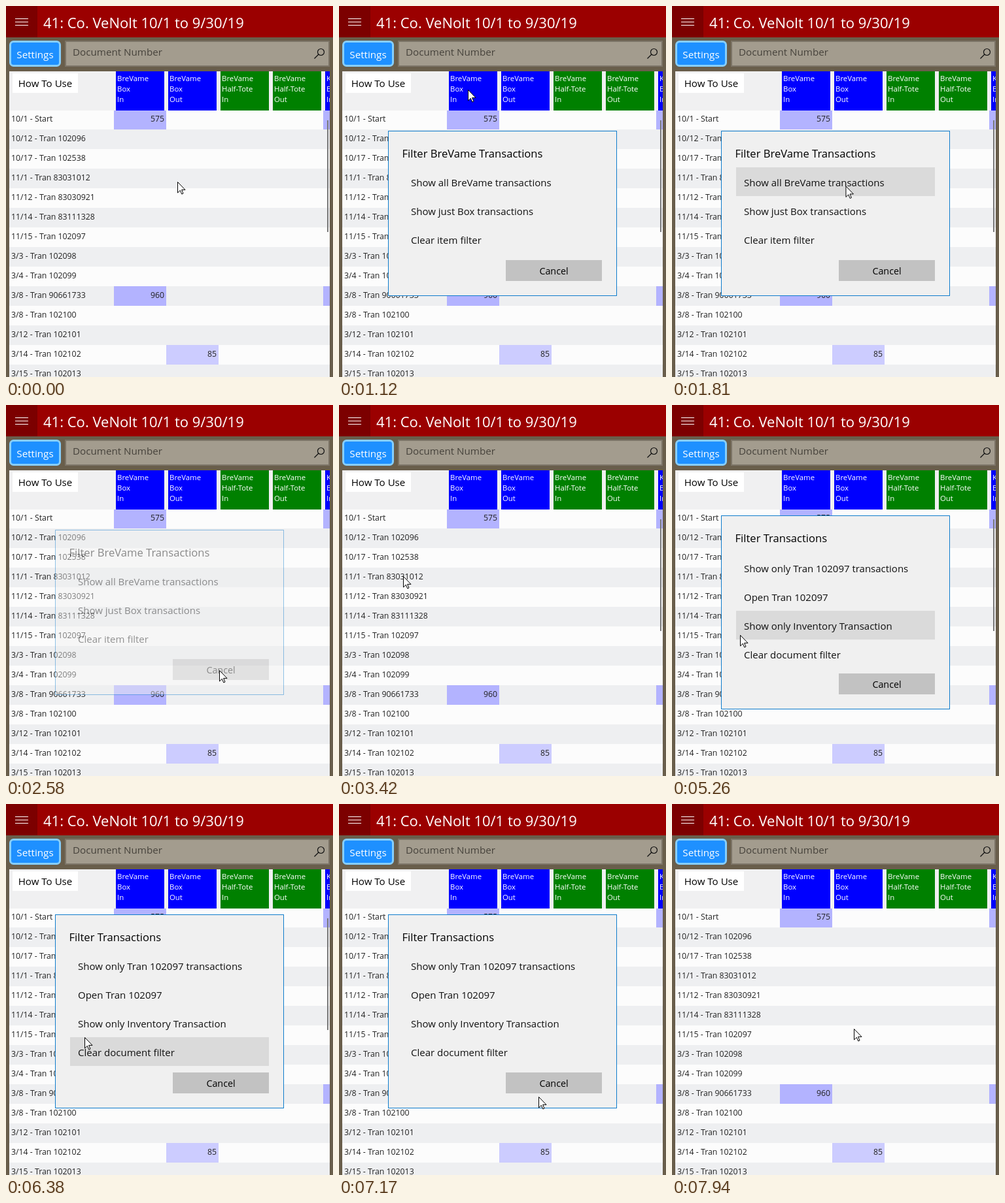
These frames come from a looping animation (500 px wide and 568 px high, 7990 ms). An HTML page:

```html
<!DOCTYPE html>
<html lang="en">
<head>
<meta charset="utf-8">
<title>Transaction filter</title>
<style>
  html, body { margin: 0; width: 100%; height: 100%; overflow: hidden; background: #695e4b; }
  svg { display: block; width: 500px; height: 568px; font-family: "Open Sans", "Noto Sans", sans-serif; }
</style>
</head>
<body>
<svg id="stage" viewBox="0 0 500 568"></svg>
<script>
const LOOP = 7990;
const FADE = 180;
const ROW = 30, COL = 80, ITEM = 44;
const BRAND = 'BreVame';
const stage = document.getElementById('stage');

const clamp = v => Math.min(1, Math.max(0, v));
const smooth = p => p * p * (3 - 2 * p);

function add(parent, tag, attrs = {}, content = '') {
  const el = document.createElementNS('http://www.w3.org/2000/svg', tag);
  for (const key in attrs) el.setAttribute(key, attrs[key]);
  el.textContent = content;
  parent.append(el);
  return el;
}
const rect = (parent, x, y, width, height, fill, more) =>
  add(parent, 'rect', { x, y, width, height, fill, ...more });
const text = (parent, x, y, size, content, fill = '#000', more) =>
  add(parent, 'text', { x, y, 'font-size': size, fill, ...more }, content);
const line = (parent, d, stroke, width) =>
  add(parent, 'path', { d, stroke, 'stroke-width': width, fill: 'none' });
const MIDDLE = { 'text-anchor': 'middle' }, END = { 'text-anchor': 'end' };

function drawBars() {
  rect(stage, 0, 0, 500, 48, '#9b0000');
  rect(stage, 0, 0, 48, 48, '#7c0000');
  line(stage, 'M14 19.5H34M14 24.5H34M14 29.5H34', '#fff', 1);
  text(stage, 57, 34, 22, '41: Co. VeNolt 10/1 to 9/30/19', '#fff');

  rect(stage, 6.5, 54.5, 76, 37, '#1e90ff', { rx: 5, stroke: '#87cefa', 'stroke-width': 3 });
  text(stage, 44.5, 80, 15.2, 'Settings', '#fff', MIDDLE);

  rect(stage, 91, 54, 403, 38, '#a39c8e', { stroke: '#7c7467', 'stroke-width': 2 });
  text(stage, 102, 76, 15.2, 'Document Number', '#46423b');
  add(stage, 'circle', { cx: 481.5, cy: 70.5, r: 5, fill: 'none', stroke: '#111', 'stroke-width': 1.2 });
  line(stage, 'M478 74L471.5 80.5', '#111', 1.3);
}

function drawGrid() {
  add(add(stage, 'clipPath', { id: 'view' }), 'rect', { x: 5, y: 100, width: 490, height: 468 });
  const grid = add(stage, 'g', { 'clip-path': 'url(#view)' });

  const rows = ['10/1 - Start', '10/12 - Tran 102096', '10/17 - Tran 102538', '11/1 - Tran 83031012',
    '11/12 - Tran 83030921', '11/14 - Tran 83111328', '11/15 - Tran 102097', '3/3 - Tran 102098',
    '3/4 - Tran 102099', '3/8 - Tran 90661733', '3/8 - Tran 102100', '3/12 - Tran 102101',
    '3/14 - Tran 102102', '3/15 - Tran 102013'];
  rows.forEach((label, i) => {
    rect(grid, 5, 159 + ROW * i, 490, ROW, i % 2 ? '#eeeff1' : '#fcfcfc');
    text(grid, 8, 177 + ROW * i, 12.3, label, '#222');
  });

  const cell = (col, row, value, fill = '#b3b3ff') => {
    const x = 165 + COL * col, y = 159 + ROW * row;
    rect(grid, x, y, COL, ROW, fill);
    text(grid, x + 77, y + 18, 12.3, value, '#222', END);
  };
  cell(0, 0, '575');
  cell(0, 9, '960');
  cell(4, 0, '');
  cell(4, 9, '');
  cell(1, 12, '85', '#ccccff');

  rect(grid, 5, 100, 490, 60, '#f0f0f1');
  rect(grid, 10, 103, 100, 30, '#fff');
  text(grid, 60, 124, 15.1, 'How To Use', '#000', MIDDLE);
  const heads = [[BRAND, 'Box', 'In'], [BRAND, 'Box', 'Out'], [BRAND, 'Half-Tote', 'In'],
    [BRAND, 'Half-Tote', 'Out'], ['Kel', 'Box', 'In']];
  heads.forEach((words, i) => {
    const x = 168 + COL * i;
    rect(grid, x, 100, 74, 60, words[1] === 'Box' ? '#0000ff' : '#008000');
    words.forEach((word, k) => text(grid, x + 2, 115 + 16 * k, 11.4, word, '#fff'));
  });

  return rect(grid, 491, 175, 2, 171, '#7a7a7a');
}

function makeDialog(y, title, items, open, close) {
  const box = add(stage, 'g');
  const height = 121 + ITEM * items.length;
  const listTop = y + 56, buttonTop = y + height - 55;
  rect(box, 75.5, y + 0.5, 349, height - 1, '#f0f0f0', { stroke: '#0f7ccc' });
  text(box, 96.5, y + 41, 16.6, title);

  const list = add(box, 'g');
  const marks = items.map((label, i) => {
    const top = listTop + ITEM * i;
    const mark = rect(list, 98, top, 304, ITEM, '#dadada');
    text(list, 110, top + 28.5, 15, label, '#111');
    return mark;
  });
  rect(box, 255, buttonTop, 147, 32, '#c2c2c2');
  const ring = rect(box, 256, buttonTop + 1, 145, 30, 'none', { stroke: '#7e7e7e', 'stroke-width': 2 });
  text(box, 328.5, buttonTop + 21.5, 14.3, 'Cancel', '#000', MIDDLE);

  const show = (el, on) => el.setAttribute('opacity', +on);
  return {
    open, close,
    update(t, [px, py]) {
      const active = t > open && t < close;
      const hovered = active && px >= 98 && px < 402 ? Math.floor((py - listTop) / ITEM) : -1;
      const onButton = active && px >= 255 && px < 402 && py >= buttonTop && py < buttonTop + 32;
      marks.forEach((mark, i) => show(mark, i === hovered));
      show(ring, onButton);
      show(box, clamp((t - open) / FADE) * clamp(1 - (t - close) / FADE));
      const slide = 28 * (1 - clamp((t - open) / 800)) ** 6;
      list.setAttribute('transform', `translate(0 ${slide})`);
    }
  };
}

// the pointer's moves: start and end time, then where its tip comes to rest
const moves = [
  [50, 400, 199, 115], [400, 500, 197, 128],
  [1530, 2070, 326, 406],
  [2690, 3170, 136, 323], [3170, 3410, 98, 262],
  [4460, 4670, 104, 352],
  [6370, 6380, 120, 357], [6420, 7170, 305, 448], [7200, 7300, 312, 432],
  [7760, 7935, 278, 344]
];
function pointerAt(t) {
  let x = 262, y = 269;
  for (const [from, to, endX, endY] of moves) {
    const p = smooth(clamp((t - from) / (to - from)));
    x += (endX - x) * p;
    y += (endY - y) * p;
  }
  return [x, y];
}

drawBars();
const scrollBar = drawGrid();
const dialogs = [
  makeDialog(191, `Filter ${BRAND} Transactions`,
    [`Show all ${BRAND} transactions`, 'Show just Box transactions', 'Clear item filter'], 650, 2482),
  makeDialog(169, 'Filter Transactions',
    ['Show only Tran 102097 transactions', 'Open Tran 102097',
      'Show only Inventory Transaction', 'Clear document filter'], 4980, 7750)
];
const cursor = add(stage, 'path', {
  d: 'M.5.5V17L4.3 13.3 6.8 19 9 18 6.6 12.4H12Z',
  fill: '#fff', stroke: '#000', 'stroke-linejoin': 'round'
});

function draw(t) {
  const tip = pointerAt(t);
  cursor.setAttribute('transform', `translate(${tip})`);
  dialogs.forEach(dialog => dialog.update(t, tip));
  // the scroll bar hides while a dialog keeps the grid idle
  const idle = dialogs.some(d => t > d.open + 1750 && t < d.close + 240);
  scrollBar.setAttribute('opacity', idle ? 0 : 1);
}

const start = performance.now();
function tick() {
  draw((performance.now() - start) % LOOP);
  requestAnimationFrame(tick);
}
tick();
</script>
</body>
</html>
```
